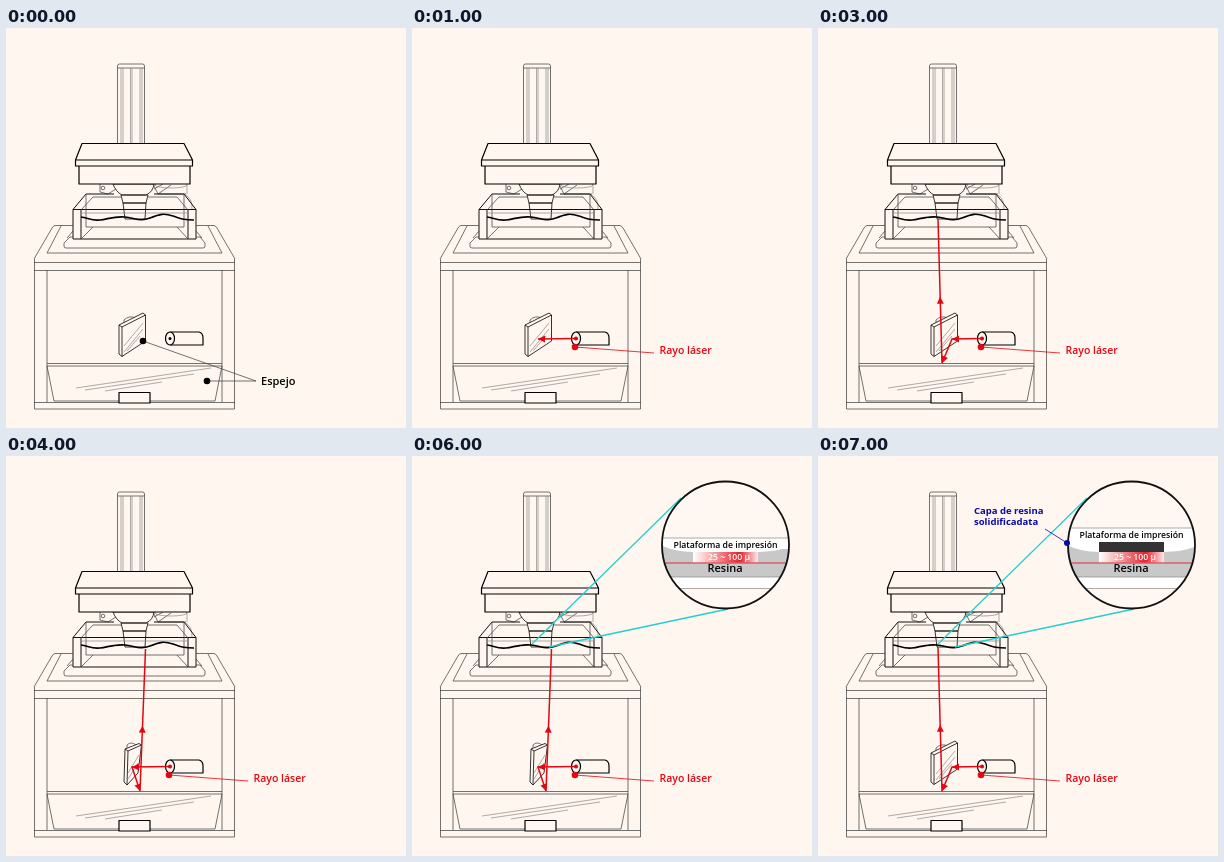
Recreate the animation shown at these times as an HTML page. Size 400 px wide and 400 px high, loop 8 s.

```html
<!DOCTYPE html>
<html lang="es">
<head>
<meta charset="utf-8">
<style>
  html, body { margin: 0; width: 100%; height: 100%; overflow: hidden; background: #fff6ef; }
  svg { display: block; width: 100vw; height: 100vh; }
  text { font: 600 10.5px "Open Sans", sans-serif; stroke: none; }
  .line { fill: none; stroke: #444; stroke-width: .75; }
  .edge { fill: none; stroke: #111; stroke-width: 1; stroke-linejoin: round; }
  .bold { fill: #fff6ef; stroke: #000; stroke-width: 1.2; stroke-linejoin: round; }
  .thin { fill: #fff6ef; stroke: #111; stroke-width: .85; stroke-linejoin: round; }
  .soft { fill: none; stroke: #888; stroke-width: .7; }
  .red { fill: none; stroke: #e30613; stroke-width: 1.5; }
  .hair { stroke-width: .8; }
  .redFill { fill: #e30613; }
  .small { font-size: 8.7px; }
  .note { font-size: 9.5px; font-weight: 700; }
</style>
</head>
<body>
<svg viewBox="0 0 400 400">
  <defs>
    <clipPath id="lens"><circle cx="313.5" cy="89" r="63.5"/></clipPath>
    <linearGradient id="depth">
      <stop offset="0" stop-color="#fff"/><stop offset=".15" stop-color="#fbd5d5"/>
      <stop offset=".72" stop-color="#e8202a"/><stop offset="1" stop-color="#fdeaea"/>
    </linearGradient>
  </defs>

  <!-- column and build head -->
  <path class="line" fill="#f8f3ee" d="M111.500 116V38q0-2 2-2h23q2 0 2 2V116M111.500 40H138.500"/>
  <path class="soft" d="M115 40V116M117 40V116M124.500 40V116M126 40V116M134 40V116M136 40V116"/>
  <path class="line" d="M94 156V164L102 166L110 161M147 156L152 166H180M148 161L157 156M152 166L165 157"/>
  <ellipse class="soft" cx="165" cy="157" rx="16" ry="3"/>
  <path class="soft" d="M181 157V166M178 166Q187 170 186 182"/>
  <circle class="line" cx="97" cy="160" r="1.800"/>
  <path class="thin" d="M107 156Q110 164 116 167H140Q147 164 148 156ZM115 167H142L140 175H117ZM117 175L119 191H139L140 175Z"/>
  <path class="bold" d="M73 138H184V156H73ZM76 115.500H178L186.500 132V138H69.500V132ZM69.500 132H186.500"/>

  <!-- resin tank -->
  <path class="edge" d="M67 181.500L80 166H108M148 166H178L190 181.500M67 181.500H190V211H67ZM75 182V211M182 182V211"/>
  <path class="line" d="M80 166V199H178V166M75 182L87 169H115M142 169H171L182 182M75 211L87 199M182 211L171 199"/>
  <path class="soft" d="M75 185H182"/>
  <path fill="none" stroke="#000" stroke-width="1.600" d="M75 189C82 190 86 193 94 192S109 188 119 189S134 194 144 190S158 185 167 188S178 192 188 192"/>

  <!-- cabinet -->
  <path class="line" d="M67 209H64L58 215V218Q58 220 60 220H197Q199 220 199 218V215L194 209H190M67 197.500H49Q47 198 46 200L28 231M190 197.500H208Q210 198 211 200L229 231M55 198L41 225H216L202 198M67 203L61 210M190 203L196 210"/>
  <path class="line" d="M28.500 231V381H228.500V231M28 234.500H229M28 242.500H229M41 242V374M216 242V374M28 374.500H229"/>
  <path class="line" d="M41 335.500H216M41 338H216L209 373H48Z"/>
  <path class="soft" d="M70 360L205 340M79 362L188 346M99 363L156 354"/>
  <rect class="bold" x="113" y="364.500" width="31" height="10.500"/>

  <!-- tilting mirror -->
  <g data-on="01237 5">
    <path class="line" d="M118 295V292Q123 287 130 290"/>
    <path class="thin" d="M113 297L137 285L139.500 287V313L116 328.500L113 326ZM113 297L116 299V328.500M116 299L139.500 287"/>
    <path class="soft" d="M118 318L137 295M118 324L137 301M121 323L134 308"/>
  </g>
  <g data-on="46">
    <path class="line" d="M121 292V289Q125 285 130 289"/>
    <path class="thin" d="M119 293L133 287.500L135.500 289L132 317L121 329L118 326ZM119 293L122 295L121 329M122 295L135.500 289"/>
    <path class="soft" d="M122 317L133 299M122 323L132 307"/>
  </g>

  <!-- laser emitter -->
  <path class="bold" d="M164 304H193Q197 305 197 310V317H164"/>
  <ellipse class="bold" cx="164" cy="310.500" rx="4.500" ry="6.500"/>
  <circle cx="164" cy="310.500" r="1.500"/>

  <g data-on="0">
    <path class="line" d="M137 313L250 353H201"/>
    <circle cx="137" cy="313" r="3.300"/><circle cx="201" cy="353" r="3.300"/>
    <text x="255" y="357" style="font-size:11px">Espejo</text>
  </g>
  <g data-on="1234567">
    <path class="red hair" d="M163 319L242 325"/>
    <circle class="redFill" cx="163" cy="319" r="3.300"/>
    <circle class="redFill" cx="164" cy="310.500" r="2"/>
    <text class="redFill" x="247.500" y="326">Rayo láser</text>
  </g>
  <g id="beam"></g>

  <!-- magnified view -->
  <g data-on="567">
    <path fill="none" stroke="#25cfd0" stroke-width="1.300" d="M120 188L269 42M137 191L316 153"/>
    <g clip-path="url(#lens)">
      <rect x="249" y="25" width="130" height="130" fill="#fff7f1"/>
      <path fill="#fff" d="M249 82H379V132H249Z"/>
      <path fill="#c9c8c9" d="M249 89Q262 96 281 96H346Q365 96 379 90V121H249Z"/>
      <g id="platform">
        <path fill="#fff" d="M249 82H379V93H346V96H281V95Q262 95 249 89Z"/>
        <path class="soft" d="M249 82H379"/>
        <text class="small" x="313.500" y="92" text-anchor="middle">Plataforma de impresión</text>
      </g>
      <path class="soft" d="M249 121H379M249 132.500H379"/>
      <rect x="281" y="96" width="65" height="10.500" fill="url(#depth)"/>
      <path class="red hair" d="M249 107H379"/>
      <text class="small" x="317" y="104" text-anchor="middle" fill="#fff">25 ~ 100 µ</text>
      <text x="313" y="116" text-anchor="middle" style="font-size:11px">Resina</text>
      <rect data-on="7" x="281" y="86" width="65" height="10" fill="#333"/>
    </g>
    <circle cx="313.500" cy="89" r="63.500" fill="none" stroke="#111" stroke-width="1.800"/>
  </g>
  <g data-on="7" fill="#0909a8">
    <path class="hair" stroke="#0909a8" d="M227 73L249 87"/>
    <circle cx="249" cy="87" r="3"/>
    <text class="note" x="156" y="58">Capa de resina</text>
    <text class="note" x="156" y="69">solidificadata</text>
  </g>
</svg>
<script>
  const layers = document.querySelectorAll('[data-on]');
  const beam = document.getElementById('beam');
  const platform = document.getElementById('platform');

  const emitter = [164, 310.5];
  const left = [emitter, [134, 311], [124, 335], [120, 191]];
  const right = [emitter, [126, 311], [134, 335], [139.5, 193]];
  const paths = [[], [emitter, [126, 311]], [emitter, [126, 311], [112, 335]],
    left, right, left, right, left];

  // Arrowheads sit at the segment ends, or midway on the rising ray.
  function arrow([x1, y1], [x2, y2], rising) {
    const k = rising ? .46 : 1;
    const angle = Math.atan2(y2 - y1, x2 - x1) * 180 / Math.PI;
    return `<path class="redFill" d="M0 0L-7 -3.500V3.500Z" transform="translate(${x1 + (x2 - x1) * k} ${y1 + (y2 - y1) * k}) rotate(${angle})"/>`;
  }

  function drawBeam(points) {
    const heads = points.slice(1).map((p, i) => arrow(points[i], p, i === 2));
    beam.innerHTML = `<polyline class="red" points="${points.join(' ')}"/>` + heads.join('');
  }

  let shown = -1;
  function tick(now) {
    const step = Math.floor(now / 1000) % 8;
    if (step !== shown) {
      shown = step;
      layers.forEach(el => el.style.display = el.dataset.on.includes(step) ? '' : 'none');
      platform.setAttribute('transform', `translate(0 ${step === 7 ? -10 : 0})`);
      drawBeam(paths[step]);
    }
    requestAnimationFrame(tick);
  }
  tick(0);
</script>
</body>
</html>
```
